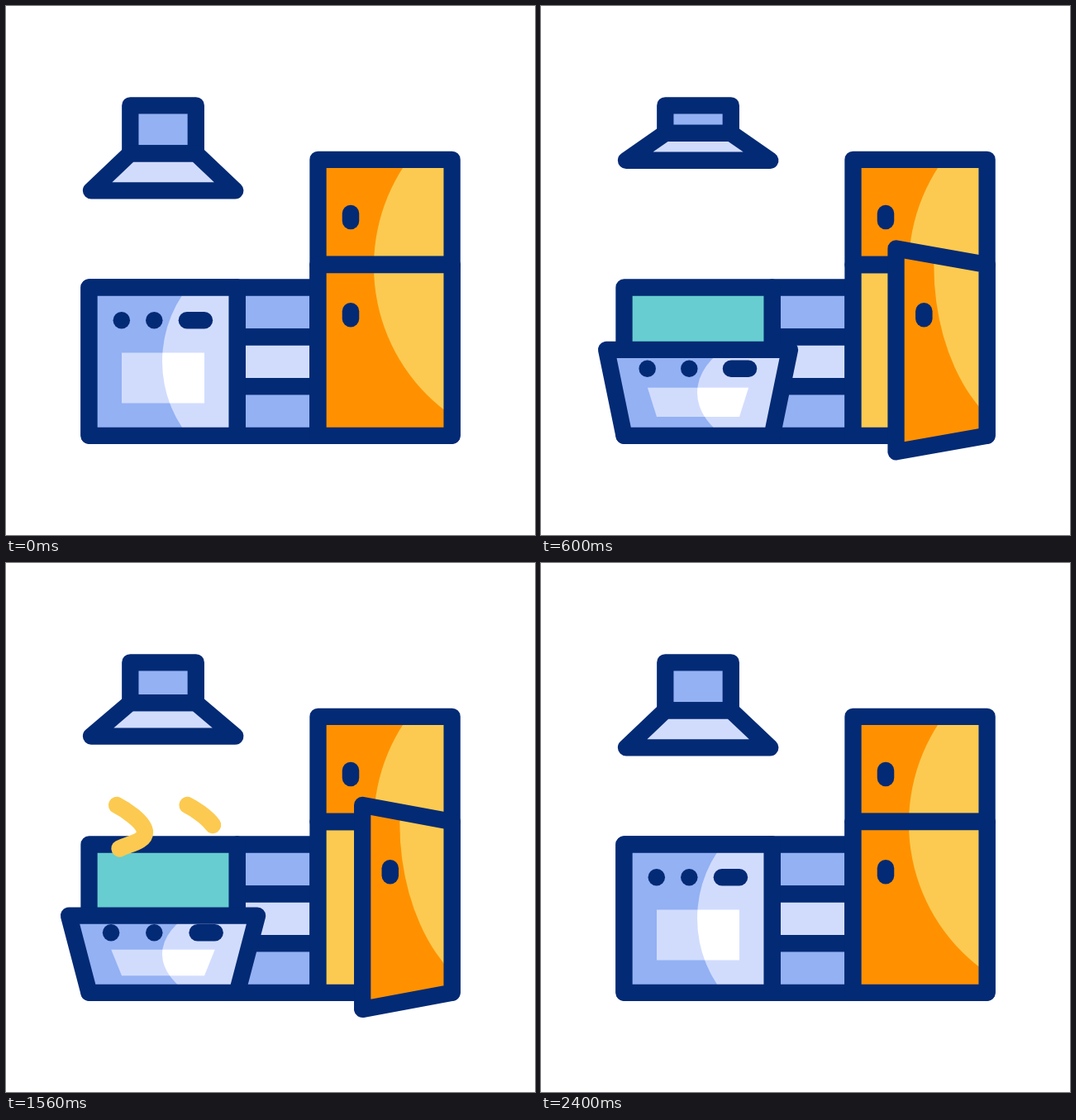
An HTML page with a canvas for the animation above (2640 ms loop, 640 px wide and 640 px high).

```html
<!DOCTYPE html>
<html lang="en">
<head>
<meta charset="utf-8">
<title>Kitchen</title>
<style>
  html, body { margin: 0; width: 100%; height: 100%; overflow: hidden; background: #fff; }
  canvas { display: block; }
</style>
</head>
<body>
<canvas id="stage" width="640" height="640"></canvas>
<script>
const ctx = document.getElementById('stage').getContext('2d');
const NAVY = '#032a75', BLUE = '#93b1f3', PALE = '#d1dcfd', TEAL = '#67cdd0';
const ORANGE = '#ff9100', YELLOW = '#fcca50', WHITE = '#fff';
const LOOP = 2640, STEP = 40;

const STEAM = 'M160 440C160 425 128 418 128 408C128 394 165 398 165 383' +
  'C165 366 130 368 130 355C130 340 168 342 168 326C168 313 142 297 134 293';
const steamPath = new Path2D(STEAM);
const steamLength = (() => {
  const el = document.createElementNS('http://www.w3.org/2000/svg', 'path');
  el.setAttribute('d', STEAM);
  return el.getTotalLength();
})();

// Timing
const progress = (t, from, to) => Math.min(1, Math.max(0, (t - from) / (to - from)));
const smooth = x => x * x * (3 - 2 * x);

// Cubic bezier easing with handles (a, 0) and (b, 1)
function ease(x, a = 0.33, b = 0) {
  let lo = 0, hi = 1;
  for (let i = 0; i < 24; i++) {
    const s = (lo + hi) / 2, r = 1 - s;
    if (3 * r * r * s * a + 3 * r * s * s * b + s * s * s < x) lo = s; else hi = s;
  }
  return smooth(lo);
}

function hoodLift(t) {
  if (t < 800) return 39 * (1 - (1 - t / 800) ** 2);
  if (t < 1400) return 39 * (1 - smooth(progress(t, 800, 1400)));
  if (t < 1800) return 39 * smooth(progress(t, 1400, 1800));
  return 39 * (1 - smooth(progress(t, 1800, 2400)));
}

const ovenDrop = t => 91.5 * (t < 1200
  ? ease(progress(t, 200, 1100))
  : ease(1 - progress(t, 1200, 2240), 0.33, 0.05));

const doorSwing = t => 69 * (t < 1200
  ? ease(progress(t, 232, 1200))
  : ease(1 - progress(t, 1200, 1800)));

// Drawing helpers
function poly(...points) {
  const p = new Path2D();
  points.forEach(([x, y]) => p.lineTo(x, y));
  p.closePath();
  return p;
}

const box = (x1, y1, x2, y2) => poly([x1, y1], [x2, y1], [x2, y2], [x1, y2]);

function fill(path, color) {
  ctx.fillStyle = color;
  ctx.fill(path);
}

function outline(path) {
  ctx.strokeStyle = NAVY;
  ctx.stroke(path);
}

function ellipse(x, y, rx, ry) {
  const p = new Path2D();
  p.ellipse(x, y, rx, ry, 0, 0, Math.PI * 2);
  return p;
}

function clipped(path, draw) {
  ctx.save();
  ctx.clip(path);
  draw();
  ctx.restore();
}

function pill(x, y, w, h) {
  const p = new Path2D();
  p.roundRect(x - w / 2, y - h / 2, w, h, Math.min(w, h) / 2);
  fill(p, NAVY);
}

// Scene parts
function drawHood(lift) {
  const mid = 178.3 - lift * 2 / 3, base = 223.3 - lift;
  const duct = box(150.3, 120.3, 229.8, mid);
  const skirt = poly([150.3, mid], [229.8, mid], [277.3, base], [103, base]);
  fill(duct, BLUE);
  fill(skirt, PALE);
  outline(duct);
  outline(skirt);
}

function drawDrawers() {
  fill(box(280, 341, 377, 400), BLUE);
  fill(box(280, 400, 377, 460), PALE);
  fill(box(280, 460, 377, 520), BLUE);
  for (const [top, bottom] of [[340.5, 400.3], [400.3, 460.2], [460.2, 519.8]]) {
    outline(box(279.8, top, 377.5, bottom));
  }
}

function drawFridge(swing) {
  const left = 377.5, right = 539.6, top = 185.8, split = 313, bottom = 519.8;
  const freezer = box(left, top, right, split);
  fill(freezer, ORANGE);
  clipped(freezer, () => fill(ellipse(665, 315, 220, 220), YELLOW));
  fill(box(left, split, right, bottom), YELLOW);
  outline(freezer);
  outline(box(left, split, right, bottom));
  pill(417, 255.5, 20.5, 29.5);

  const edge = left + swing, tilt = swing * 0.375;
  const scale = (right - edge) / (right - left);
  const door = poly([edge, split - tilt], [right, split], [right, bottom], [edge, bottom + tilt]);
  fill(door, ORANGE);
  clipped(door, () =>
    fill(ellipse(right + (665 - right) * scale, 315, 220 * scale, 220), YELLOW));
  outline(door);
  pill(417 + swing * 0.89, 373.7, 20.5, 29.5);
}

function drawSteam(t, x, delay) {
  const head = smooth(progress(t - delay, 610, 1243)) * steamLength;
  const tail = smooth(progress(t - delay, 715, 1852)) * steamLength;
  if (head - tail < 0.5) return;
  ctx.save();
  ctx.translate(x, 0);
  ctx.strokeStyle = YELLOW;
  ctx.setLineDash([head - tail, steamLength * 2]);
  ctx.lineDashOffset = -tail;
  ctx.stroke(steamPath);
  ctx.restore();
}

function drawOvenDoor(drop) {
  const left = 100.5, right = 279.6, top = 340.5, bottom = 519.8;
  const flare = drop * 0.284, shift = flare * 0.52;
  const scale = 1 - drop / (bottom - top);
  const at = y => bottom - (bottom - y) * scale;
  const door = poly([left - flare, at(top)], [right + flare, at(top)], [right, bottom], [left, bottom]);
  const shine = ellipse(334, at(430), 145, 145 * scale);
  const pane = poly([140 - shift, at(419.5)], [240 + shift, at(419.5)], [240, at(480.5)], [140, at(480.5)]);
  fill(door, BLUE);
  clipped(door, () => fill(shine, PALE));
  fill(pane, PALE);
  clipped(pane, () => fill(shine, WHITE));
  outline(door);
  const knobs = at(380.2);
  pill(139.8 - shift, knobs, 20.5, 20.5);
  pill(179.3, knobs, 20.5, 20.5);
  pill(229.4 + shift, knobs, 41.5, 20.5);
}

function render(t) {
  fill(box(0, 0, 640, 640), WHITE);
  ctx.lineWidth = 20.3;
  ctx.lineJoin = ctx.lineCap = 'round';
  drawHood(hoodLift(t));
  drawDrawers();
  drawFridge(doorSwing(t));
  const oven = box(100.5, 340.5, 279.6, 519.8);
  fill(oven, TEAL);
  outline(oven);
  drawSteam(t, 0, 170);
  drawSteam(t, 85.5, 0);
  drawOvenDoor(ovenDrop(t));
}

const start = performance.now();
function tick() {
  const t = (performance.now() - start) % LOOP;
  render(Math.min(2400, Math.floor(t / STEP) * STEP));
  requestAnimationFrame(tick);
}
tick();
</script>
</body>
</html>
```
